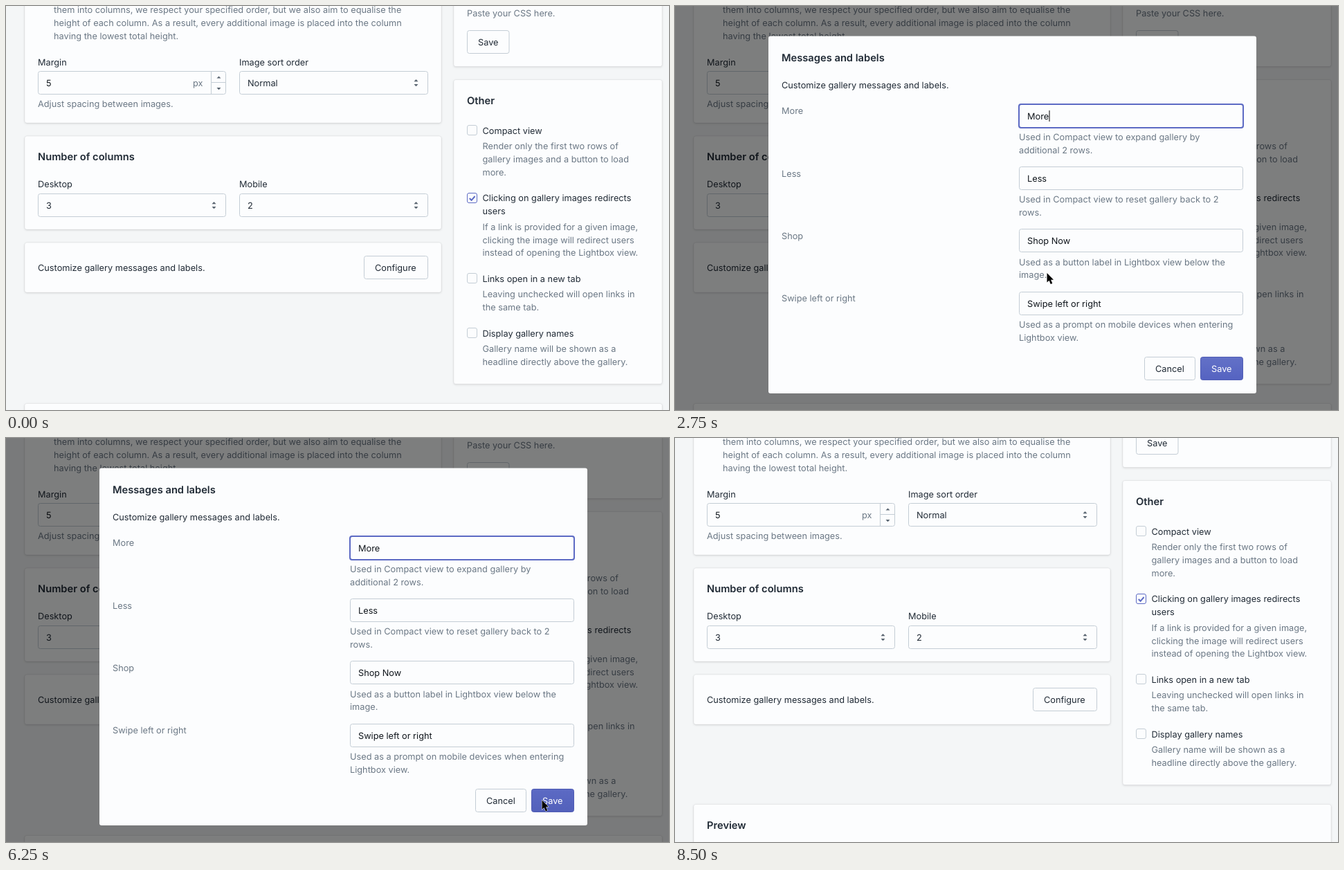
An HTML page for the animation above (9.25 s loop, 958 px wide and 584 px high).

```html
<!DOCTYPE html>
<html lang="en">
<head>
<meta charset="utf-8">
<title>Gallery settings</title>
<style>
  html, body { margin: 0; width: 100%; height: 100%; overflow: hidden; background: #f4f6f7; }
  svg { display: block; }
  text { font: 400 12.75px Inter, "Open Sans", sans-serif; fill: #212b36; text-rendering: geometricPrecision; white-space: pre; }
  .muted { fill: #6b7885; }
  .value { fill: #10161c; }
  .title { font-size: 14.7px; font-weight: 600; }
  .light { fill: #fff; }
  .card { fill: #fcfdfe; stroke: rgba(63, 63, 68, .07); filter: drop-shadow(0 1px 1.5px rgba(63, 63, 68, .17)); }
  .field { fill: #fcfdfe; stroke: #c4cdd5; }
  .line { stroke: #c4cdd5; }
  .focus { fill: none; stroke: #5c6ac4; stroke-width: 2; }
  .icon { fill: #56626e; }
</style>
</head>
<body>
<svg id="stage" width="958" height="584" viewBox="0 0 958 584">
  <defs>
    <linearGradient id="primary" x2="0" y2="1">
      <stop offset="0" stop-color="#6371c7"/><stop offset="1" stop-color="#5563c1"/>
    </linearGradient>
    <linearGradient id="primaryHover" x2="0" y2="1">
      <stop offset="0" stop-color="#5c6ac4"/><stop offset="1" stop-color="#5361bb"/>
    </linearGradient>
  </defs>
  <rect width="958" height="584" fill="#f4f6f7"/>
  <g id="settings"></g>
  <g id="sidebar"></g>
  <rect id="backdrop" width="958" height="584"/>
  <rect id="panel" x="135" y="43.5" width="705" height="516.5" rx="3" fill="#fcfdfe"/>
  <g id="form"></g>
  <path id="cursor" d="M0 0V13.6L3.1 10.8L5.3 16L7.8 14.9L5.6 9.8H9.5Z" stroke="#fff" stroke-width="1" paint-order="stroke"/>
</svg>
<script>
const LOOP = 9250;
const LINE = 18.8;
const $ = id => document.getElementById(id);

// Text is placed by the vertical centre of its first line.
const text = (x, y, content, cls = '') => content.split('\n').map((line, i) =>
  `<text class="${cls}" x="${x}" y="${y + 4.6 + i * LINE}">${line}</text>`).join('');

const box = (cls, left, top, right, bottom, r = 3, extra = '') =>
  `<rect class="${cls}" x="${left}" y="${top}" width="${right - left}" height="${bottom - top}" rx="${r}" ${extra}/>`;

const arrow = (x, y, dir) => `<path class="icon" d="M${x - 3} ${y}h6l-3 ${3.2 * dir}z"/>`;

const select = (left, right, top, value) =>
  box('field', left, top, right, top + 33) + text(left + 11.5, top + 16.6, value) +
  arrow(right - 17, top + 14.8, -1) + arrow(right - 17, top + 18.6, 1);

const button = (left, top, right, label) =>
  box('field', left, top, right, top + 33) + text(left + 15.5, top + 16.6, label);

const option = (y, label, help, checked) => {
  const rows = label.split('\n').length;
  const top = Math.round(y - 7) - .5;
  return box('field', 666.5, top, 680.5, top + 14, 2.5, checked ? 'style="stroke:#5c6ac4"' : '') +
    (checked ? `<path d="M669.8 ${y + .2}l2.8 2.8l5-5.8" fill="none" stroke="#5c6ac4" stroke-width="2"/>` : '') +
    text(688.5, y, label) + text(688.5, y + 22.6 + (rows - 1) * LINE, help, 'muted');
};

const message = (y, label, value, help) => {
  const top = Math.floor(y - 9.4) + .5;
  return text(154, y, label, 'muted') + box('field', 497.5, top, 820.5, top + 33) +
    text(509, y + 7.5, value, 'value') + text(497, y + 37.6, help, 'muted');
};

$('settings').innerHTML =
  box('card', 27, -20, 629, 169) +
  text(69, 5.7, 'them into columns, we respect your specified order, but we also aim to equalise the\n' +
    'height of each column. As a result, every additional image is placed into the column\n' +
    'having the lowest total height.', 'muted') +
  text(46, 81, 'Margin') +
  box('field', 46.5, 94.5, 317.5, 127.5) + text(58, 111.1, '5', 'value') + text(270, 111.1, 'px', 'muted') +
  '<path class="line" d="M296.5 94.5v33M296.5 110.5h21"/>' +
  arrow(307.5, 104.6, -1) + arrow(307.5, 118, 1) +
  text(46, 141.3, 'Adjust spacing between images.', 'muted') +
  text(337, 81, 'Image sort order') + select(337.5, 609.5, 94.5, 'Normal') +
  box('card', 27, 188, 629, 323) +
  text(46, 218.8, 'Number of columns', 'title') +
  text(46, 257.8, 'Desktop') + select(46.5, 317.5, 271.5, '3') +
  text(337, 257.8, 'Mobile') + select(337.5, 609.5, 271.5, '2') +
  box('card', 27, 342, 629, 414) +
  text(46, 378.3, 'Customize gallery messages and labels.') +
  button(517.5, 361.5, 609.5, 'Configure');

$('sidebar').innerHTML =
  box('card', 647, -20, 948, 87.5) +
  text(666, 10.5, 'Paste your CSS here.', 'muted') +
  button(666.5, 35.5, 727, 'Save') +
  box('card', 647, 106.5, 948, 546.5) +
  text(666, 137, 'Other', 'title') +
  option(180, 'Compact view', 'Render only the first two rows of\ngallery images and a button to load\nmore.') +
  option(277.8, 'Clicking on gallery images redirects\nusers',
    'If a link is provided for a given image,\nclicking the image will redirect users\ninstead of opening the Lightbox view.', true) +
  option(394.2, 'Links open in a new tab', 'Leaving unchecked will open links in\nthe same tab.') +
  option(473.2, 'Display gallery names', 'Gallery name will be shown as a\nheadline directly above the gallery.') +
  box('card', 27, 574.5, 948, 760) +
  text(46, 605.3, 'Preview', 'title');

$('form').innerHTML =
  text(154, 75, 'Messages and labels', 'title') +
  text(154, 114, 'Customize gallery messages and labels.') +
  message(151.8, 'More', 'More', 'Used in Compact view to expand gallery by\nadditional 2 rows.') +
  message(242.1, 'Less', 'Less', 'Used in Compact view to reset gallery back to 2\nrows.') +
  message(332.3, 'Shop', 'Shop Now', 'Used as a button label in Lightbox view below the\nimage.') +
  message(422.6, 'Swipe left or right', 'Swipe left or right', 'Used as a prompt on mobile devices when entering\nLightbox view.') +
  box('focus', 497, 142, 821, 176, 3, 'id="focus"') +
  button(678.5, 507.5, 751.5, 'Cancel') +
  box('', 759.5, 507.5, 820.5, 540.5, 3, 'id="save" stroke="#4f5cb4"') +
  text(775, 524, 'Save', 'light') +
  '<rect id="caret" x="540.5" y="151" width="1" height="16"/>';

// [start ms, x, y]; entries without a position hide the pointer.
const pointer = [
  [0], [500, 577.5, -9], [750], [1500, 580, 307.5], [1750, 514.5, 380], [2000, 537.5, 386],
  [3250, 574, 378], [3500, 590, 371], [3750, 607, 348], [4000, 597.5, 310], [4250, 640, 300],
  [4500, 674, 290], [5000, 731.5, 468.5], [5250, 752, 500], [5500, 774.5, 523.5], [7750, 796, 172.5], [8000]
];

// [start ms, opacity of the panel, of its form, of the backdrop]
const dialog = [[0, 0, 0, 0], [2500, .35, .13, .06], [2750, 1, 1, .5], [7000, 1, 1, .47], [7250, 0, 0, 0]];

const at = (keys, t) => keys.findLast(key => key[0] <= t);
const fade = (id, opacity) => $(id).setAttribute('opacity', opacity);

function draw(t) {
  const [, panel, form, backdrop] = at(dialog, t);
  fade('panel', panel);
  fade('form', form);
  fade('backdrop', backdrop);
  fade('focus', t < 2750 ? 0 : 1);
  fade('caret', Math.floor(t / 500) % 2);
  $('save').setAttribute('fill', t < 6250 ? 'url(#primary)' : 'url(#primaryHover)');
  $('sidebar').setAttribute('transform', `translate(0 ${t < 8500 ? 0 : -45})`);

  const [, x, y] = at(pointer, t);
  $('cursor').setAttribute('visibility', x === undefined ? 'hidden' : 'visible');
  if (x !== undefined) $('cursor').setAttribute('transform', `translate(${x} ${y})`);
}

const start = performance.now();
function tick() {
  draw((performance.now() - start) % LOOP);
  requestAnimationFrame(tick);
}
tick();
</script>
</body>
</html>
```
